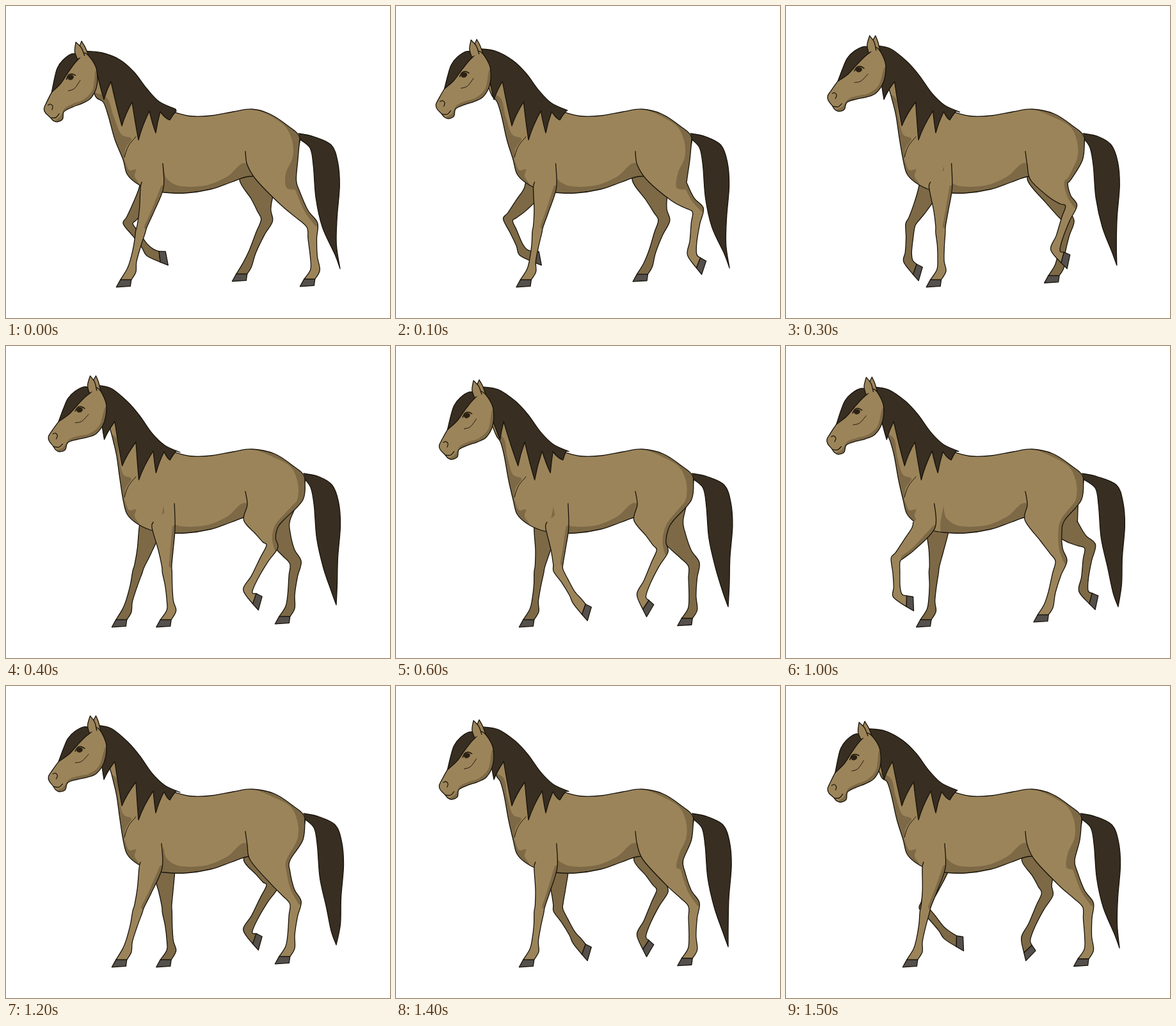
Animation, 600 px wide and 487 px high, one loop 1600 ms. Source, as an HTML page with a canvas:

```html
<!DOCTYPE html>
<html lang="en">
<head>
<meta charset="utf-8">
<title>Walking horse</title>
<style>
html, body { margin: 0; width: 100%; height: 100%; overflow: hidden; background: #fff; }
canvas { display: block; }
</style>
</head>
<body>
<canvas id="stage" width="600" height="487"></canvas>
<script>
const ctx = document.getElementById('stage').getContext('2d');
const COAT = '#9c845a', SHADE = '#7d6946', HAIR = '#382e22', HOOF = '#55504c', INK = '#17130a';
const FRAME_MS = 100, FRAMES = 16, HALF = FRAMES / 2;
const { PI, sin, cos, abs, max, min, hypot, atan2 } = Math;

// Hoof travel: phase and x, straight lines between.
const FRONT_STEPS = [[0, 185], [5, 263], [6, 297], [10, 193], [11, 205], [12, 178], [14, 205], [16, 185]];
const HIND_STEPS = [[0, 472], [2, 480], [4, 392], [6, 393], [8, 366], [12, 433], [16, 472]];
// Position along the joints, half width in front, half width behind.
const FRONT_SHAPE = [[0, 18, 18], [0.5, 11, 12], [0.85, 8, 7.5], [1, 8, 7], [1.35, 5.5, 5.5], [1.75, 5, 5], [2, 6.5, 8]];
const HIND_SHAPE = [[0, 31, 31], [0.4, 18, 18], [0.75, 11, 10], [1, 8, 10], [1.3, 7, 6.5], [1.7, 5.5, 5.5], [2, 6.5, 8]];

function track(steps, phase) {
  const i = steps.findIndex(s => s[0] > phase);
  const [[p0, x0], [p1, x1]] = [steps[i - 1], steps[i]];
  return x0 + (x1 - x0) * (phase - p0) / (p1 - p0);
}

// Middle joint of two bones, bent towards the front.
function bend(from, to, upper, lower) {
  const dx = to[0] - from[0], dy = to[1] - from[1], d = hypot(dx, dy);
  const stretch = max(1, d / (upper + lower)), a = upper * stretch, b = lower * stretch;
  const reach = (a * a - b * b + d * d) / (2 * d), out = Math.sqrt(max(0, a * a - reach * reach));
  return [from[0] + (dx * reach - dy * out) / d, from[1] + (dy * reach + dx * out) / d];
}

// The pastern tips forward on the ground and folds back as the hoof lifts.
function pastern(hoof, lift, fold) {
  const angle = (118 - fold * lift ** 0.4) * PI / 180;
  return [hoof[0] - 22 * cos(angle), hoof[1] - 22 * sin(angle)];
}

function frontJoints(phase) {
  const lift = max(0, sin(PI * max(0, min(1, (phase - 5) / 7))));
  const hoof = [track(FRONT_STEPS, phase), 432 - 40 * lift];
  const fetlock = pastern(hoof, lift, 98);
  const elbow = [226 + 0.29 * (hoof[0] - 178) - 20 * lift, 284];
  return [elbow, bend(elbow, fetlock, 66, 56), fetlock, hoof];
}

function hindJoints(phase) {
  const lift = phase < HALF ? sin(PI * (phase / HALF) ** 0.6) : 0;
  const hoof = [track(HIND_STEPS, phase), 427 + 4 * cos(PI * phase / HALF) - 33 * lift];
  const fetlock = pastern(hoof, lift, 75);
  const hock = [fetlock[0] + 0.33 * (468 - fetlock[0]) + 9 * lift, fetlock[1] - 69];
  return [[396 + 0.25 * (hoof[0] - 366), 272], hock, fetlock, hoof];
}

// Smooth line through points; joins the given path with a sharp corner.
function smooth(pts, path, closed) {
  const n = pts.length, joined = !!path;
  path = path || new Path2D();
  const p = i => closed ? pts[(i + n) % n] : pts[max(0, min(n - 1, i))];
  if (joined) path.lineTo(...pts[0]); else path.moveTo(...pts[0]);
  for (let i = 0; i < (closed ? n : n - 1); i++) {
    const [a, b, c, d] = [p(i - 1), p(i), p(i + 1), p(i + 2)];
    path.bezierCurveTo(b[0] + (c[0] - a[0]) / 6, b[1] + (c[1] - a[1]) / 6,
      c[0] - (d[0] - b[0]) / 6, c[1] - (d[1] - b[1]) / 6, c[0], c[1]);
  }
  if (closed) path.closePath();
  return path;
}

const blob = pts => smooth(pts, null, true);

function polygon(pts) {
  const path = new Path2D();
  pts.forEach(p => path.lineTo(...p));
  path.closePath();
  return path;
}

function fill(path, color) { ctx.fillStyle = color; ctx.fill(path); }

function ink(path, width = 1.3, color = INK) {
  ctx.strokeStyle = color;
  ctx.lineWidth = width;
  ctx.stroke(path);
}

function paint(path, color) { fill(path, color); ink(path); }

function inside(path, draw) {
  ctx.save();
  ctx.clip(path);
  draw();
  ctx.restore();
}

function along(joints, s) {
  const i = max(0, min(joints.length - 2, Math.floor(s))), u = s - i;
  return [0, 1].map(k => joints[i][k] + (joints[i + 1][k] - joints[i][k]) * u);
}

function makeLeg(joints, shape, frontTop, backTop) {
  const [, , fetlock, foot] = joints;
  const angle = atan2(foot[1] - fetlock[1], foot[0] - fetlock[0]) + 1.02;
  const c = cos(angle), s = sin(angle);
  const hoof = [[6, 5], [13, -6], [-9, -6], [-11, 4]]
    .map(([x, y]) => [foot[0] + x * c - y * s, foot[1] + x * s + y * c]);
  const front = [...frontTop], back = [...backTop];
  for (const [at, wideFront, wideBack] of shape) {
    const [x, y] = along(joints, at);
    const a = along(joints, at - 0.25), b = along(joints, at + 0.25);
    const len = hypot(b[0] - a[0], b[1] - a[1]);
    const [nx, ny] = at ? [(a[1] - b[1]) / len, (b[0] - a[0]) / len] : [-1, 0];
    front.push([x + nx * wideFront, y + ny * wideFront]);
    back.push([x - nx * wideBack, y - ny * wideBack]);
  }
  front.push(hoof[0]);
  back.push(hoof[3]);
  const outline = smooth(front);
  smooth([...back].reverse(), outline);
  return { outline, back, hoof: polygon(hoof) };
}

function drawLeg(leg, color, shading) {
  fill(leg.outline, color);
  if (shading) inside(leg.outline, shading);
  ink(leg.outline);
  paint(leg.hoof, HOOF);
}

function drawTail(rump, frame) {
  const side = 524 + 4.5 * cos(PI * (frame - 9.5) / 8);
  const flick = 3 * cos(PI * frame / 4);
  const tip = [519 + flick, 407 + flick];
  const tail = smooth([[rump - 2, 199], [rump + 22, 204], [side - 12, 217], [side - 2, 243],
    [side + 1, 280], [side - 3, 330], [side - 4, 372], tip]);
  smooth([tip, [tip[0] - 8, tip[1] - 22], [side - 26, 345], [side - 36, 300], [side - 40, 250],
    [side - 45, 222], [rump, 208]], tail);
  paint(tail, HAIR);
}

function bodyPath(eyeX, eyeY, reach, rump) {
  return blob([
    [eyeX + 30, eyeY - 15], [eyeX + 37 + 9 * reach, eyeY + 28], [152 + 16 * reach, 150], [160 + 13 * reach, 172],
    [170 + 8 * reach, 208], [183, 240], [189, 262], [203, 276], [225, 287], [247, 291], [280, 292],
    [320, 286], [352, 275], [380, 266], [430, 264], [rump - 10, 238], [rump, 206], [rump - 20, 186],
    [rump - 48, 168], [384, 161], [355, 165], [322, 171], [290, 172], [264, 166], [240, 157],
    [205, 122], [165, 86]
  ]);
}

function drawBody(body, reach, rumpShade) {
  fill(body, COAT);
  inside(body, () => {
    fill(rumpShade, SHADE);
    fill(blob([[246, 250], [251, 269], [272, 281], [312, 280], [346, 266], [373, 245],
      [400, 270], [350, 300], [250, 305]]), SHADE);
    fill(blob([[120 + 20 * reach, 135], [156 + 15 * reach, 142], [168 + 8 * reach, 172], [180 + 3 * reach, 200],
      [196, 207], [187, 222], [182, 242], [160, 210], [140, 165]]), SHADE);
    fill(blob([[184, 240], [192, 256], [203, 255], [201, 266], [208, 280], [188, 285]]), SHADE);
  });
  ink(body);
  ink(smooth([[203, 204], [191, 219], [185, 236]]), 1);
}

function drawMane(reach, frame) {
  const sway = 14 * max(0, cos(PI * (frame - 7.5) / 8)) ** 2;
  const low = 1 - reach;
  const tips = [[256, 178], [234, 198], [207, 209], [181, 187], [153, 146]];
  const notches = [[247, 165], [230, 164], [203, 150], [170, 118], [146, 95]];
  const mane = smooth([
    [140 - 22 * low, 61 + 9 * low], [164 - 14 * low, 66 + 7 * low], [190 - 12 * low, 87 - 3 * low],
    [209 - 9 * low, 109 - 6 * low], [228 - 8 * low, 136 - 7 * low], [248 - 9 * low, 155 - 6 * low], [272 - 7 * low, 166 - 5 * low]
  ]);
  let from = [266, 164];
  mane.lineTo(...from);
  tips.forEach((tip, i) => {
    const x = tip[0] + sway * min(1, (i + 2) / 4), y = tip[1];
    const to = [notches[i][0] - 6 * low, notches[i][1]];
    mane.quadraticCurveTo(x + (from[0] - x) * 0.35, (from[1] + y) / 2, x, y);
    mane.quadraticCurveTo(x + (to[0] - x) * 0.5, (to[1] + y) / 2 + 4, ...to);
    from = to;
  });
  mane.closePath();
  paint(mane, HAIR);
}

function drawEar(x, tilt) {
  const tip = [x + tilt, -53];
  const ear = smooth([[x, -27], [x - 2, -39], tip]);
  smooth([tip, [x + 9, -43], [x + 12, -30]], ear);
  paint(ear, COAT);
}

// Head coordinates are relative to the eye.
function drawHead(x, y, turn) {
  ctx.save();
  ctx.translate(x, y);
  ctx.rotate(turn * PI / 180);
  drawEar(20, 5);
  const head = blob([[15, -31], [-8, -14], [-34, 18], [-45, 33], [-50, 41], [-49, 48], [-43, 56], [-39, 62],
    [-33, 65], [-24, 62], [-20, 51], [-5, 46], [10, 43], [25, 37], [37, 20], [41, -5], [36, -22], [27, -34]]);
  fill(head, COAT);
  inside(head, () => fill(blob([[-36, 63], [-27, 58], [-18, 46], [-4, 41], [14, 37], [30, 24], [40, -4],
    [50, 20], [25, 50], [-30, 72]]), SHADE));
  ink(head);
  const forelock = smooth([[24, -33], [7, -36], [-8, -29], [-19, -18], [-26, -3], [-34, 18]]);
  smooth([[-34, 18], [-18, 7], [-4, -8], [8, -20], [18, -28], [24, -33]], forelock);
  paint(forelock, HAIR);
  drawEar(14, 2);
  const eye = new Path2D();
  eye.ellipse(-1, 0, 5, 4, -0.2, 0, 7);
  fill(eye, '#2b2114');
  ink(smooth([[-8, 2], [-4, -4], [2, -5], [7, -2]]), 1.5);
  ink(smooth([[-8, 20], [2, 18], [13, 7]]), 0.9);
  ink(smooth([[-43, 37], [-39, 36], [-36, 40], [-38, 45]]), 1.2);
  ink(smooth([[-42, 57], [-34, 58], [-28, 53]]), 1.2);
  ctx.restore();
}

function draw(frame) {
  // Head and rump nod once per step, twice per stride.
  const reach = abs(sin(PI * frame / HALF));
  const raise = 0.5 + 0.5 * cos(2 * PI * (frame - 3.4) / HALF);
  const eyeX = 102 + 14 * reach, eyeY = 112 - 13 * raise, rump = 459 + 8 * reach;
  const farPhase = (frame + HALF) % FRAMES;
  const rumpShade = blob([[382, 158], [410, 170], [rump - 24, 187], [rump - 12, 210], [rump - 11, 236],
    [rump - 22, 262], [440, 285], [rump + 8, 275], [rump + 12, 200], [rump - 20, 175]]);

  ctx.fillStyle = '#fff';
  ctx.fillRect(0, 0, 600, 487);
  ctx.lineJoin = ctx.lineCap = 'round';

  drawTail(rump, frame);
  const farHip = hindJoints(farPhase), farElbow = frontJoints(farPhase);
  drawLeg(makeLeg(farHip, HIND_SHAPE, [[farHip[0][0] - 22, 245]], [[rump - 8, 238]]), SHADE);
  drawLeg(makeLeg(farElbow, FRONT_SHAPE, [[farElbow[0][0] - 14, 260]], [[farElbow[0][0] + 17, 260]]), SHADE);
  drawBody(bodyPath(eyeX, eyeY, reach, rump), reach, rumpShade);

  const hind = makeLeg(hindJoints(frame), HIND_SHAPE, [[374, 227], [377, 248]], [[rump, 207], [rump - 3, 240]]);
  drawLeg(hind, COAT, () => {
    fill(rumpShade, SHADE);
    ink(smooth(hind.back.slice(1, 6)), 11, SHADE);
  });

  const shoulder = frontJoints(frame), [elbowX, elbowY] = shoulder[0];
  const front = makeLeg(shoulder, FRONT_SHAPE, [[elbowX - 16, elbowY - 9]], [[elbowX + 17, 246]]);
  drawLeg(front, COAT, () => ink(smooth(front.back.slice(1, 4)), 9, SHADE));

  drawMane(reach, frame);
  drawHead(eyeX, eyeY, -10 * (1 - raise));
}

const start = performance.now();
function tick() {
  draw(Math.floor((performance.now() - start) / FRAME_MS) % FRAMES);
  requestAnimationFrame(tick);
}
tick();
</script>
</body>
</html>
```
